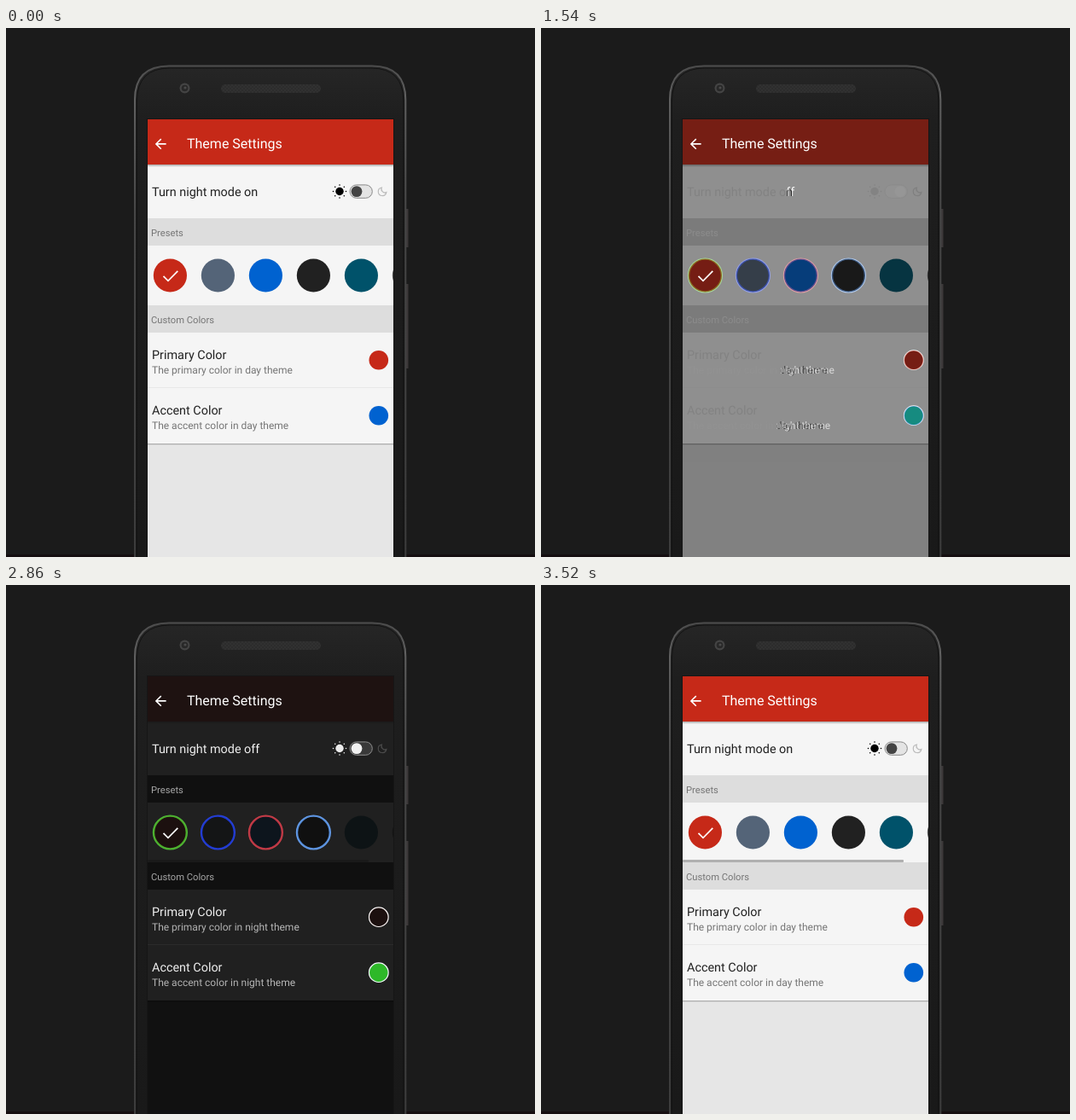
These frames come from a looping animation (620x620 px, 3.63 s). An HTML page:

```html
<!DOCTYPE html>
<html lang="en">
<head>
<meta charset="utf-8">
<title>Theme Settings</title>
<style>
  html, body { margin: 0; width: 100%; height: 100%; overflow: hidden; background: #1b1b1b; }
  svg { display: block; width: 620px; height: 620px; font-family: Roboto, sans-serif; text-rendering: geometricPrecision; }
  .title { font-size: 16px; }
  .row { font-size: 14.4px; }
  .sub { font-size: 12px; }
  .section { font-size: 11.2px; }
</style>
</head>
<body>
<svg viewBox="0 0 620 620">
  <defs>
    <clipPath id="screen"><path d="M166 107H454V620H166Z"/></clipPath>
    <linearGradient id="rim" x1="0" x2="0" y1="0" y2="1">
      <stop offset="0" stop-color="#4c4c4c"/>
      <stop offset=".06" stop-color="#606060"/>
      <stop offset=".3" stop-color="#464646"/>
      <stop offset="1" stop-color="#3c3c3c"/>
    </linearGradient>
    <linearGradient id="face" x1="0" x2="0" y1="0" y2="1">
      <stop offset="0" stop-color="#262626"/>
      <stop offset=".11" stop-color="#1e1e1e"/>
      <stop offset="1" stop-color="#191919"/>
    </linearGradient>
    <linearGradient id="shade" x1="0" x2="0" y1="0" y2="1">
      <stop offset="0" stop-opacity=".32"/>
      <stop offset="1" stop-opacity="0"/>
    </linearGradient>
    <pattern id="mesh" width="4" height="4" patternUnits="userSpaceOnUse">
      <rect width="4" height="4" fill="#313131"/>
      <circle cx="1" cy="1" r=".8" fill="#262626"/>
      <circle cx="3" cy="3" r=".8" fill="#262626"/>
    </pattern>
  </defs>

  <path d="M0 617H620V620H0Z" fill="#150e10"/>
  <path d="M468 212h3.500v45h-3.500zM468 300h3.500v99h-3.500z" fill="#3c3839"/>
  <path d="M151 622V84Q151 44.500 191 44.500H429Q468.300 44.500 468.300 84V622Z" fill="url(#face)" stroke="url(#rim)" stroke-width="2"/>
  <path d="M153.500 620V86Q153.500 47 192 47H428Q465.800 47 465.800 86V620" fill="none" stroke="#131313"/>
  <rect x="252" y="66" width="117" height="10" rx="5" fill="url(#mesh)"/>
  <circle cx="209.500" cy="70.500" r="6" fill="#444"/>
  <circle cx="209.500" cy="70.500" r="3.800" fill="#282828"/>
  <circle cx="210" cy="70" r="1.600" fill="#4a4a4a"/>
  <path d="M165 106H455V620H165Z" fill="#161616"/>
  <g id="stage" clip-path="url(#screen)"></g>
</svg>

<script>
const LOOP = 3630, STEP = 110;
const TOGGLE_ON = 595, TOGGLE_OFF = 2145, SLIDE = 250, RELOAD = 2750;

// Night layer opacity: [time, value]
const FADE = [
  [1100, 0], [1210, .03], [1320, .104], [1430, .25], [1650, .63], [1760, .78],
  [1870, .9], [1980, .97], [2090, 1], [2750, 1], [2860, .926], [2970, .84],
  [3080, .735], [3190, .52], [3300, .26], [3410, .07], [3520, 0]
];

const themes = {
  day: {
    header: '#c62918', panel: '#f5f5f5', section: '#ddd', body: '#e6e6e6', line: '#e8e8e8',
    text: '#212121', sub: '#757575', label: '#757575', state: 'on',
    fills: ['#c62918', '#546478', '#0062d0', '#212121', '#00526a', '#555'], rings: [],
    primary: '#c62918', accent: '#0062d0', edge: 'none',
    track: '#e4e4e4', border: '#888', knob: '#444',
    sun: ['#000', '#a9a9a9'], moon: ['#bbb', '#333'], shadow: true
  },
  night: {
    header: '#111', panel: '#0f0f0f', section: '#000', body: '#000', line: '#1c1c1c',
    text: '#fff', sub: '#b8b8b8', label: '#aaa', state: 'off',
    fills: Array(6).fill('#0f0f0f'), rings: ['#43b52a', '#1a35d6', '#c8323a', '#5b96e8'],
    primary: '#0f0f0f', accent: '#32bf1c', edge: '#fff',
    track: '#2c2c2c', border: '#909090', knob: '#fff',
    sun: ['#fff', '#555'], moon: ['#444', '#e0e0e0'], shadow: false
  }
};

const band = (y, h, fill) => `<rect x="166" y="${y}" width="288" height="${h}" fill="${fill}"/>`;
const dot = (x, y, r, fill, more = '') => `<circle cx="${x}" cy="${y}" r="${r}" fill="${fill}" ${more}/>`;
const text = (cls, x, y, fill, s) => `<text class="${cls}" x="${x}" y="${y}" fill="${fill}">${s}</text>`;

function presets(t) {
  return t.fills.map((fill, i) => {
    const x = 192.4 + 56 * i, ring = t.rings[i];
    return dot(x, 290, 19.6, fill) +
      (ring ? dot(x, 290, 19.4, 'none', `stroke="${ring}" stroke-width="2.4"`) : '');
  }).join('') +
    '<path d="M184.500 290.800L190 296.300L201.300 284.800" fill="none" stroke="#fff" stroke-width="1.700"/>';
}

function sun() {
  let out = dot(391, 191.5, 4.7, 'currentColor');
  for (let i = 0; i < 8; i++) {
    const a = i * Math.PI / 4;
    out += dot(391 + 7.5 * Math.cos(a), 191.5 + 7.5 * Math.sin(a), .8, 'currentColor');
  }
  return `<g class="sun">${out}</g>`;
}

function setting(t, y, name, color) {
  const mode = t === themes.day ? 'day' : 'night';
  return text('row', 171, y, t.text, name + ' Color') +
    text('sub', 171, y + 16.5, t.sub, `The ${name.toLowerCase()} color in ${mode} theme`) +
    dot(436.8, y + 1.2, 11.3, color, `stroke="${t.edge}" stroke-width="1.2"`);
}

function screen(name) {
  const t = themes[name];
  return `<g id="${name}">` +
    band(107, 513, t.body) + band(160, 327, t.panel) + band(107, 53, t.header) +
    band(223, 32, t.section) + band(325, 32, t.section) + band(421, 1, t.line) +
    (t.shadow ? band(160, 3, 'url(#shade)') + band(487, 2, 'url(#shade)') : '') +
    '<path transform="translate(171.600 126.300) scale(.8)" fill="#fff" d="M20 11H7.830l5.590-5.590L12 4l-8 8 8 8 1.410-1.410L7.830 13H20z"/>' +
    text('title', 212, 141.3, '#fff', 'Theme Settings') +
    text('row', 171, 197, t.text, 'Turn night mode ' + t.state) +
    sun() +
    `<rect x="403" y="183.900" width="26.300" height="15.400" rx="7.700" fill="${t.track}" stroke="${t.border}"/>` +
    dot(411, 191.6, 6.4, t.knob, 'class="knob"') +
    '<path class="moon" fill="none" stroke-width="1.200" d="M440.300 187A4.800 4.800 0 1 0 445.800 192.600A4.200 4.200 0 0 1 440.300 187Z"/>' +
    text('section', 170, 244, t.label, 'Presets') + presets(t) +
    text('section', 170, 345.5, t.label, 'Custom Colors') +
    setting(t, 388, 'Primary', t.primary) + setting(t, 453, 'Accent', t.accent) +
    '</g>';
}

const stage = document.getElementById('stage');
stage.innerHTML = screen('day') + screen('night');
const layers = Object.keys(themes).map(name => {
  const root = document.getElementById(name);
  const [sun, moon, knob] = ['.sun', '.moon', '.knob'].map(s => root.querySelector(s));
  return { root, sun, moon, knob, theme: themes[name] };
});
const [day, night] = layers;
day.root.insertAdjacentHTML('beforeend', '<rect id="bar" x="166" y="322" width="259" height="3" rx="1" fill="#b0b0b0"/>');
const bar = document.getElementById('bar');

function fadeAt(t) {
  const i = FADE.findIndex(([time]) => time > t);
  if (i < 1) return 0;
  const [t0, a] = FADE[i - 1], [t1, b] = FADE[i];
  return a + (b - a) * (t - t0) / (t1 - t0);
}

const slide = (t, start) => {
  const u = Math.min(1, Math.max(0, (t - start) / SLIDE));
  return 1 - (1 - u) ** 1.5;
};

function draw(t) {
  const on = t >= TOGGLE_ON && t < TOGGLE_OFF ? 1 : 0;
  const x = 411 + 10 * (slide(t, TOGGLE_ON) - slide(t, TOGGLE_OFF));
  for (const { sun, moon, knob, theme } of layers) {
    sun.setAttribute('color', theme.sun[on]);
    moon.setAttribute('stroke', theme.moon[on]);
    knob.setAttribute('cx', x);
  }
  night.root.setAttribute('opacity', fadeAt(t));
  bar.setAttribute('visibility', t >= RELOAD ? 'visible' : 'hidden');
}

function tick() {
  draw(Math.floor(performance.now() % LOOP / STEP) * STEP);
  requestAnimationFrame(tick);
}
tick();
</script>
</body>
</html>
```
